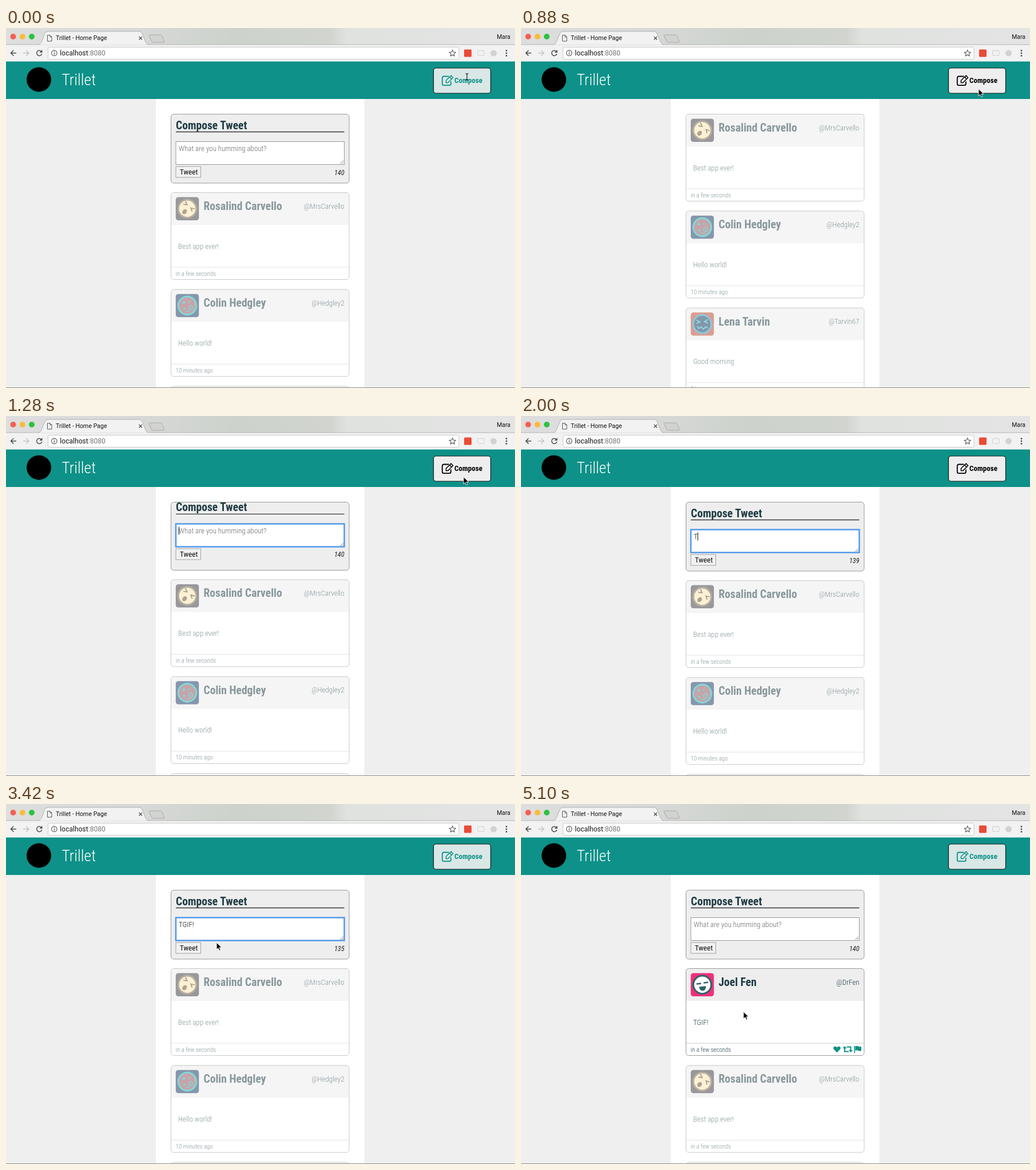
Recreate the animation shown at these times as an HTML page. Size 890 px wide and 629 px high, loop 5.12 s.

```html
<!DOCTYPE html>
<html lang="en">
<head>
<meta charset="utf-8">
<title>Home Page</title>
<style>
  html, body { margin: 0; width: 100%; height: 100%; overflow: hidden; background: #efefef; }
  svg { display: block; width: 100vw; height: 100vh; }
  text { font-family: Roboto, Arial, sans-serif; white-space: pre; }
  .cond { font-family: "Roboto Condensed", Roboto, "Liberation Sans", sans-serif; font-stretch: condensed; }
</style>
</head>
<body>
<svg id="stage" viewBox="0 0 890 629" xmlns="http://www.w3.org/2000/svg"></svg>
<script>
const LOOP = 5120, SLIDE = 400, CLOSE = 355, OPEN = 910, POST = 3740;
const FORM_TOP = 150.5, FORM_H = 120.5, PITCH = 169.3;
const TEAL = '#0d9188', INK = '#203c44';
const MESSAGE = 'TGIF!', KEYS = [1960, 2140, 2260, 2380, 2580];
const MOUSE = [
  [0, 806, 85], [40, 806, 86], [240, 800, 106.5], [2740, 800, 106.5],
  [2880, 767, 134], [3560, 324, 254], [3960, 324, 254], [4560, 389, 363], [LOOP, 389, 363]
];
const stage = document.getElementById('stage');
const $ = id => document.getElementById(id);

// Use real condensed faces when present, otherwise one common narrowing factor.
function condensedFactor() {
  stage.innerHTML = '<text font-size="40">Compose message</text><text class="cond" font-size="40">Compose message</text>';
  const [wide, slim] = [...stage.children].map(e => e.getComputedTextLength());
  return slim < wide * 0.95 ? 1 : 0.88;
}
const K = condensedFactor();

const text = (x, y, str, size, weight, fill, extra = '') =>
  `<text class="cond" transform="translate(${x} ${y}) scale(${K} 1)" font-size="${size}" font-weight="${weight}" fill="${fill}" ${extra}>${str}</text>`;
const plain = (x, y, str, size, fill, extra = '') =>
  `<text x="${x}" y="${y}" font-size="${size}" fill="${fill}" ${extra}>${str}</text>`;
const box = (x, y, w, h, fill, extra = '') =>
  `<rect x="${x}" y="${y}" width="${w}" height="${h}" fill="${fill}" ${extra}/>`;
const dot = (x, y, r, fill, extra = '') => `<circle cx="${x}" cy="${y}" r="${r}" fill="${fill}" ${extra}/>`;
const line = (d, stroke, w, extra = '') =>
  `<path d="${d}" fill="none" stroke="${stroke}" stroke-width="${w}" ${extra}/>`;
const END = 'text-anchor="end"';

// Faces are drawn in a 40 x 40 square.
const face = (bg, ring, skin, parts) =>
  box(0, 0, 40.5, 40.5, bg, 'rx="4.5"') + dot(20.2, 20.2, 15.7, skin, `stroke="${ring}" stroke-width="3"`) + parts;

const people = [
  {
    name: 'Joel Fen', handle: '@DrFen', body: MESSAGE, age: 'in a few seconds',
    face: face('#f22f7c', '#2b6468', '#fff',
      line('M10 19l8-1M22.500 17l8-1', '#2b6468', 2.6) +
      '<path d="M14.500 24l12-1.500q0 8-5.500 8.500-5 0-6.500-7z" fill="#2b6468"/>')
  },
  {
    name: 'Rosalind Carvello', handle: '@MrsCarvello', body: 'Best app ever!', age: 'in a few seconds',
    face: face('#3e3e46', '#77694c', '#fbe6ad',
      '<g transform="rotate(40 20 20)">' +
      line('M9.500 12l6 3-5.500 3.500M30.500 12l-6 3 5.500 3.500', '#665334', 2) +
      '<ellipse cx="20" cy="27" rx="3.600" ry="4.800" fill="#665334"/></g>')
  },
  {
    name: 'Colin Hedgley', handle: '@Hedgley2', body: 'Hello world!', age: '10 minutes ago',
    face: face('#1c3c64', '#17b4ba', '#98525a',
      dot(14, 15, 2.4, '#17b4ba') + dot(23, 14, 1.6, '#17b4ba') + dot(15, 25.500, 2, '#17b4ba') +
      dot(26, 24, 4, 'none', 'stroke="#17b4ba" stroke-width="1.5"') + dot(26, 24, 1.3, '#17b4ba') +
      line('M17 29q4 3 8 1', '#17b4ba', 1.4))
  },
  {
    name: 'Lena Tarvin', handle: '@Tarvin67', body: 'Good morning', age: '2 hours ago',
    face: face('#bb4a30', '#2498c8', '#163c5b',
      line('M10 13l6 3.500-6 2.500M30 12l-6 4 6 2.500M11 24l3 4 4-3 4 4 4-4 4 2', '#2ab5d6', 2))
  }
];

const heart = 'M7 12L1.200 6.300C-.8 4 .7 .6 3.400 .6 5.200 .6 6.300 1.700 7 2.800 7.700 1.700 8.800 .6 10.600 .6 13.300 .6 14.800 4 12.800 6.300Z';
const icons = `<g class="icons" fill="${TEAL}">
  <path transform="translate(257.500 135.500) scale(.93)" d="${heart}"/>
  ${line('M277.500 138.500v6.500h7M281 137h7v6', TEAL, 2)}
  <path d="M274 139.500l3.500-4 3.500 4zM284.500 142.500h7l-3.500 4z"/>
  <path d="M294 135h1.600v12.500h-1.600zM296 136q3-1.500 5.500 0t5 0v7.500q-2.500 1.500-5 0t-5.500 0z"/></g>`;

const card = (p, i) => `<g id="card${i}">
  ${box(0, 0, 311.5, 152, '#fff', 'rx="5"')}
  <path d="M0 56.500V5q0-5 5-5h301.500q5 0 5 5v51.500z" fill="#eee"/>
  ${line('M0 130.500H311.500', '#ccc', 1)}
  ${box(0, 0, 311.5, 152, 'none', 'rx="5" stroke="#999"')}
  <g transform="translate(8.300 8)">${p.face}</g>
  ${text(57, 30.5, p.name, 19.6, 700, INK)}
  ${text(303, 28, p.handle, 13, 300, INK, END)}
  ${text(12.5, 98, p.body, 13, 300, INK)}
  ${text(8.3, 145, p.age, 10.8, 300, INK)}
  ${icons}</g>`;

const browser = `
  ${box(0, 0, 890, 30, 'url(#strip)')}
  ${dot(12.5, 15, 5, '#f55f55')}${dot(28.8, 15, 5, '#f7bd3b')}${dot(45, 15, 5, '#2ac43e')}
  <path d="M250 13q0-1 1.500-1h18.500q2 0 3 2l3.500 9q.8 2-1 2h-18q-2 0-3-2z" fill="#d2d3d1" stroke="#a9aaa8"/>
  ${box(0, 29, 890, 30, '#f2f2f2')}
  ${line('M0 29H890', '#b4b4b4', 1)}
  <path d="M56 29.600q4-.6 5.500-4l6.500-16q1.500-3.500 5-3.500h160q3.500 0 5 3.500l6.500 16q1.500 3.400 5.500 4z" fill="#f2f2f2"/>
  ${line('M56 29q4-.4 5.500-3.500l6.500-16q1.500-3.500 5-3.500h160q3.500 0 5 3.500l6.500 16q1.500 3.100 5.500 3.500', '#b0b0b0', 1)}
  ${line('M72.500 12.500h4.500l3 3v7.500h-7.500zM77 12.500v3h3', '#555', 1)}
  ${plain(87, 21.3, 'Trillet - Home Page', 10.6, '#111')}
  ${line('M232.500 15l5.500 5.500m0-5.500l-5.500 5.500', '#444', 1.1)}
  ${plain(882, 19, 'Mara', 10.4, '#111', END)}
  ${line('M18 43.700H8.500m4.700-4.700l-4.700 4.700 4.700 4.700', '#4c4c4c', 1.5)}
  ${line('M30 43.700h10m-4.700-4.700l4.700 4.700-4.700 4.700', '#c4c4c4', 1.4)}
  ${line('M62 41.200a4.600 4.600 0 1 0 .7 3.800', '#4c4c4c', 1.5)}
  <path d="M63.500 38v5h-5z" fill="#4c4c4c"/>
  ${box(73.5, 33.5, 718.5, 21, '#fff', 'rx="2.5" stroke="#c9c9c9"')}
  ${dot(84.3, 43.7, 4.8, 'none', 'stroke="#555" stroke-width="1.1"')}
  ${line('M84.300 42.800v4M84.300 40.600v1.300', '#555', 1.2)}
  ${plain(94.3, 48, 'localhost<tspan fill="#777">:8080</tspan>', 12.1, '#151515')}
  ${line('M780.700 38.500l1.600 3.600 3.900.4-2.900 2.600.8 3.900-3.400-2-3.400 2 .8-3.900-2.900-2.600 3.900-.4z', '#555', 1.1)}
  ${box(801, 37.5, 13, 13, '#ea4b36', 'rx="1.5"')}
  ${box(824.5, 39.5, 11.5, 8.5, 'none', 'stroke="#cfcfcf" rx="1"')}
  ${dot(852.5, 44, 5.5, '#d2d2d2')}
  ${[39.5, 44, 48.5].map(y => dot(875, y, 1.4, '#505050')).join('')}
  ${box(0, 58.5, 890, 65.5, TEAL)}
  ${dot(57.5, 90, 21.5, '#000')}
  ${text(97.5, 100, 'Trillet', 27.5, 300, '#fff')}`;

const compose = `<g id="compose">
  ${box(747.5, 70, 100, 44, '#eee', 'id="composeBg" rx="4.5" stroke="#161616" stroke-width="1.2"')}
  ${line('M774.500 84.500h-9q-2.700 0-2.700 2.700v10.300q0 2.700 2.700 2.700h9.700q2.700 0 2.700-2.700v-4', 'currentColor', 1.8)}
  ${line('M769.500 95.500v-4l8.800-8.300 3.200 3.600-8.600 8.700zM775.700 85.600l3.400 3.700', 'currentColor', 1.5)}
  ${text(784, 96.2, 'Compose', 13.1, 700, 'currentColor')}</g>`;

const form = `<g id="form">
  <g clip-path="url(#formClip)">
    ${box(288.5, FORM_TOP, 311.5, FORM_H, '#eee')}
    <g id="formBody">
      ${text(297, 176.5, 'Compose Tweet', 19.6, 700, INK)}
      ${line('M297 181.500H591.500', '#33383a', 1.3)}
      ${box(297, 198.5, 294.5, 40, '#fff', 'id="field"')}
      ${line('M584.500 237l5.500-5.500M587.500 237l2.500-2.500', '#777', 0.9)}
      ${text(302, 215.2, 'What are you humming about?', 13, 300, '#666', 'id="hint"')}
      ${text(302, 215.2, '', 13, 300, '#111', 'id="typed"')}
      ${box(301.8, 203.5, 1, 14, '#000', 'id="caret"')}
      ${box(297, 242, 43.5, 19, '#f1f1f1', 'stroke="#a2a2a2"')}
      ${text(304, 255.8, 'Tweet', 13.2, 400, '#111')}
      ${text(591.7, 256.5, '140', 12.4, 400, '#222', 'id="count" font-style="italic" ' + END)}
    </g>
  </g>
  ${box(288.5, FORM_TOP, 311.5, FORM_H, 'none', 'id="formEdge" rx="5" stroke="#999"')}</g>`;

stage.innerHTML = `<defs>
    <linearGradient id="strip"><stop offset="0" stop-color="#dedede"/><stop offset=".28" stop-color="#d6d8d6"/>
      <stop offset=".45" stop-color="#cdd2cc"/><stop offset=".64" stop-color="#d2d5cf"/>
      <stop offset=".67" stop-color="#dfe2df"/><stop offset="1" stop-color="#e4e4e4"/></linearGradient>
    <clipPath id="formClip">${box(288.5, FORM_TOP, 311.5, FORM_H, '#000', 'id="clipBox" rx="5"')}</clipPath>
  </defs>
  ${box(0, 124, 890, 505, '#efefef')}${box(262, 124, 364.5, 505, '#fff')}
  ${people.map(card).join('')}${form}${browser}${compose}
  ${box(0, 628, 890, 1, '#8d8d8d')}
  <g id="mouse">
    <path id="arrow" d="M0 0V12.300L2.900 9.600 4.900 14.200 7 13.300 5 8.800H9Z" fill="#000" stroke="#fff" stroke-width=".9"/>
    ${line('M-2.500-5.500q2.500 0 2.500 2V4q0 2-2.500 2M2.500-5.500q-2.500 0-2.500 2V4q0 2 2.500 2', '#111', 1.1, 'id="beam"')}
  </g>`;

const show = (el, on) => el.setAttribute('display', on ? 'inline' : 'none');
const set = (id, name, value) => $(id).setAttribute(name, value);
const swing = p => 0.5 - Math.cos(Math.PI * Math.min(1, Math.max(0, p))) / 2;
const inside = ([x, y], x0, y0, x1, y1) => x >= x0 && x <= x1 && y >= y0 && y <= y1;

function mouseAt(t) {
  const i = MOUSE.findIndex(m => m[0] > t);
  const [t0, x0, y0] = MOUSE[i - 1], [t1, x1, y1] = MOUSE[i];
  const p = swing((t - t0) / (t1 - t0));
  return [x0 + (x1 - x0) * p, y0 + (y1 - y0) * p];
}

function drawForm(t) {
  const opening = t >= OPEN && t < OPEN + SLIDE;
  const hidden = t >= CLOSE + SLIDE && t < OPEN;
  const h = FORM_H * (t < OPEN ? 1 - swing((t - CLOSE) / SLIDE) : swing((t - OPEN) / SLIDE));
  show($('form'), !hidden);
  set('clipBox', 'height', h);
  set('formEdge', 'height', h);
  set('formBody', 'transform', `translate(0 ${opening ? -Math.min(45.5, 129 - h) : 0})`);

  const focus = t >= CLOSE && t < POST;
  const typed = t < POST ? MESSAGE.slice(0, KEYS.filter(k => k <= t).length) : '';
  const wake = [CLOSE, OPEN, ...KEYS].filter(k => k <= t).pop();
  set('field', 'stroke', focus ? '#4d96ea' : '#999');
  set('field', 'stroke-width', focus ? 2.4 : 1);
  $('typed').textContent = typed;
  $('count').textContent = 140 - typed.length;
  show($('hint'), !typed);
  show($('caret'), focus && (t - wake) % 1000 < 500);
  set('caret', 'x', 301.8 + (typed ? $('typed').getComputedTextLength() * K : 0));
  return hidden ? FORM_TOP : FORM_TOP + h + 16.5;
}

function drawCards(t, top, mouse) {
  const first = t < POST ? 1 : 0;
  people.forEach((_, i) => {
    const el = $('card' + i), y = top + (i - first) * PITCH;
    const over = inside(mouse, 288, y, 600, y + 152);
    show(el, i >= first);
    el.setAttribute('transform', `translate(288.5 ${y})`);
    el.setAttribute('opacity', over ? 1 : 0.53);
    show(el.querySelector('.icons'), over);
  });
}

function draw(t) {
  const mouse = mouseAt(t);
  drawCards(t, drawForm(t), mouse);

  const hover = t > 40 && inside(mouse, 747, 70, 848, 114);
  set('compose', 'color', hover ? '#000' : TEAL);
  set('composeBg', 'fill', hover ? '#eee' : '#d9e7e6');

  const beam = inside(mouse, 784, 82, 833, 99) || inside(mouse, 297, 198, 592, 239);
  show($('mouse'), t < KEYS[0] || t > 2740);
  set('mouse', 'transform', `translate(${mouse})`);
  show($('beam'), beam);
  show($('arrow'), !beam);
}

const start = performance.now();
function tick() {
  draw((performance.now() - start) % LOOP);
  requestAnimationFrame(tick);
}
tick();
</script>
</body>
</html>
```
